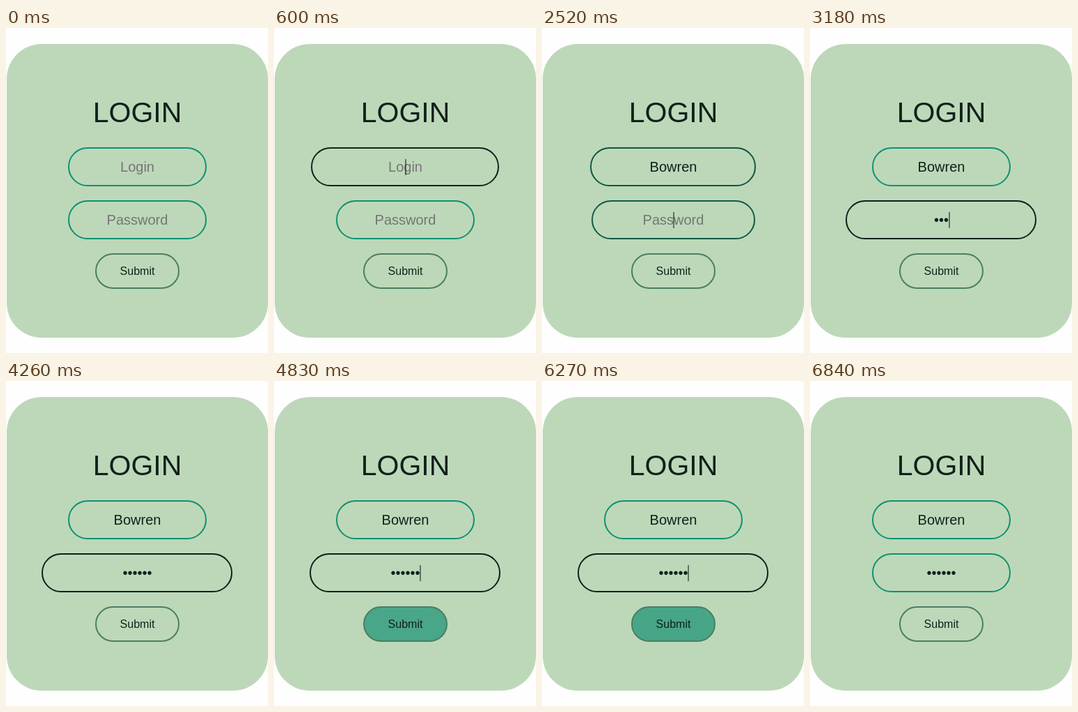
An HTML page that plays this animation: 376 px wide and 466 px high, repeating every 6.87 s.

```html
<!DOCTYPE html>
<html lang="en">
<head>
<meta charset="utf-8">
<title>Login form</title>
<style>
  :root {
    --ink: #10201a;
    --rest: #0e9170;
    --loop: 6870ms;
  }
  html, body {
    margin: 0;
    width: 100%;
    height: 100%;
    overflow: hidden;
    background: #fefefe;
  }
  body {
    position: relative;
    color: var(--ink);
    font-family: "Liberation Sans", Arial, sans-serif;
  }
  .card, .title, .field, .submit {
    position: absolute;
    box-sizing: border-box;
    text-align: center;
  }
  .card {
    left: 1px;
    top: 23px;
    width: 375px;
    height: 421px;
    border-radius: 50px;
    background: #bdd8b9;
  }
  .title {
    left: 1px;
    top: 101px;
    width: 375px;
    margin: 0;
    font-size: 41px;
    font-weight: 400;
    line-height: 41px;
  }
  .field {
    left: 89px;
    width: 199px;
    height: 56px;
    padding-top: 17px;
    font-size: 20px;
    line-height: 23px;
    display: flex;
    justify-content: center;
    align-items: flex-start;
  }
  .user { top: 171px; }
  .pass { top: 247px; }
  .field::before {
    content: "";
    position: absolute;
    inset: 0;
    border: 2px solid var(--rest);
    border-radius: 28px;
  }
  .user::before { animation: user var(--loop) infinite; }
  .pass::before { animation: pass var(--loop) infinite; }
  .hint {
    position: absolute;
    left: 0;
    right: 0;
    color: #757575;
  }
  .caret {
    position: relative;
    width: 2px;
    height: 23px;
    margin: 0 -1.5px 0 -.5px;
    background: rgba(16, 32, 26, .55);
    visibility: hidden;
  }
  .submit {
    left: 128px;
    top: 323px;
    width: 121px;
    height: 51px;
    border: 2px solid #4a7f60;
    border-radius: 26px;
    font-size: 16px;
    line-height: 47px;
    animation: hover var(--loop) infinite;
  }

  /* Focus widens and darkens a field over 250 ms */
  @keyframes user {
    0%, 6.041%, 39.301%, 100% { left: 0; right: 0; border-color: var(--rest); }
    9.68%, 35.662% { left: -38px; right: -37px; border-color: var(--ink); }
  }
  @keyframes pass {
    0%, 35.662%, 99.564%, 100% { left: 0; right: 0; border-color: var(--rest); }
    39.301%, 99.563% { left: -38px; right: -37px; border-color: var(--ink); }
  }
  @keyframes hover {
    0%, 69.025%, 93.086%, 100% { background-color: rgba(68, 165, 134, 0); }
    70.772%, 91.194% { background-color: rgb(68, 165, 134); }
  }
</style>
</head>
<body>
<div class="card"></div>
<h1 class="title">LOGIN</h1>
<div class="field user"><span class="hint">Login</span><span class="value"></span><i class="caret"></i></div>
<div class="field pass"><span class="hint">Password</span><span class="value"></span><i class="caret"></i></div>
<div class="submit">Submit</div>
<script>
  const LOOP = 6870;

  // keys: when each character lands; caret: [on, off] spans, all in ms
  const fields = [
    {
      root: '.user',
      text: 'Bowren',
      keys: [1230, 1500, 1590, 1860, 2040, 2190],
      caret: [[420, 930], [1230, 2460]]
    },
    {
      root: '.pass',
      text: '••••••',
      keys: [2940, 3030, 3180, 3360, 3540, 3750],
      caret: [[2460, 4260], [4770, 5280], [5790, 6300], [6810, 6840]]
    }
  ];

  for (const f of fields) {
    const find = name => document.querySelector(`${f.root} .${name}`);
    f.hint = find('hint');
    f.value = find('value');
    f.bar = find('caret');
  }

  const show = (el, on) => { el.style.visibility = on ? 'visible' : 'hidden'; };

  function draw(t) {
    for (const f of fields) {
      const count = f.keys.filter(k => t >= k).length;
      f.value.textContent = f.text.slice(0, count);
      show(f.hint, count === 0);
      show(f.bar, f.caret.some(([on, off]) => t >= on && t < off));
    }
  }

  let start;
  function tick(now) {
    start ??= now;
    draw((now - start) % LOOP);
    requestAnimationFrame(tick);
  }
  draw(0);
  requestAnimationFrame(tick);
</script>
</body>
</html>
```
